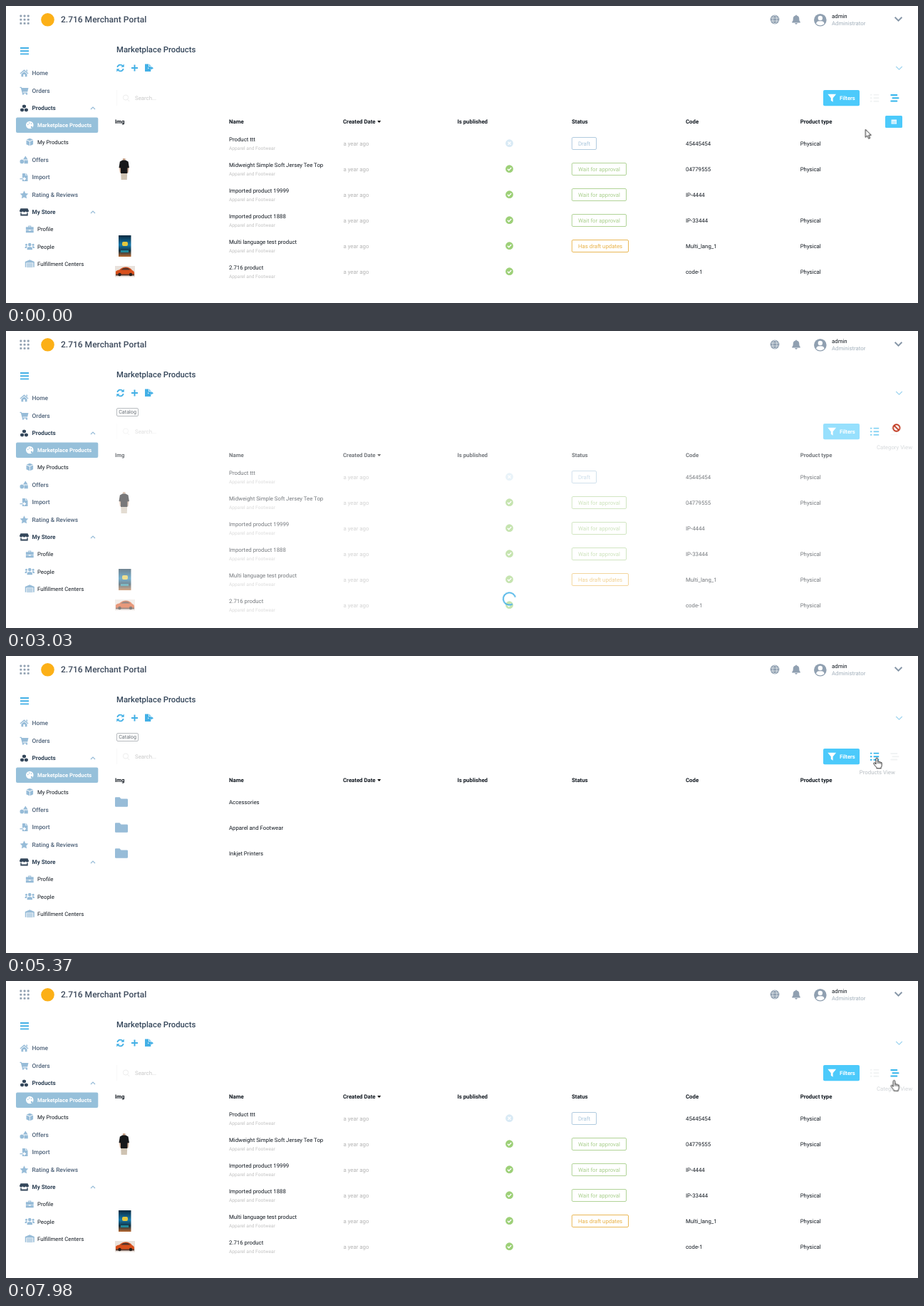
An HTML page that plays this animation: 1280 px wide and 417 px high, repeating every 8 s.

```html
<!DOCTYPE html>
<html lang="en">
<head>
<meta charset="utf-8">
<title>Vendor portal</title>
<style>
html, body { margin: 0; width: 100%; height: 100%; overflow: hidden; background: #fff; }
svg { display: block; width: 100%; height: 100%; }
text { font: 400 7.8px Roboto, Arial, sans-serif; fill: #111820; text-rendering: geometricPrecision; white-space: pre; }
.title { font-size: 12px; font-weight: 500; fill: #3d4a5c; }
.h1 { font-size: 11.3px; font-weight: 500; fill: #34465a; }
.item { font-size: 8.4px; font-weight: 500; fill: #4d6178; }
.section { font-size: 8.2px; font-weight: 700; fill: #2f4256; }
.on { font-weight: 700; font-size: 7.7px; fill: #fff; }
.head { font-weight: 700; }
.sub { font-size: 6.65px; fill: #c2c2c2; }
.dim { fill: #b4b4b4; }
.hint { fill: #c8c8c8; }
.tag { font-size: 7.2px; fill: #666d74; }
.role { fill: #a3b0bc; }
.tip { fill: #b7bdc2; }
.ico { fill: #97bcd8; }
.dark { fill: #34475b; }
.top { fill: #90a0b1; }
.blue { fill: #43b0e6; }
.line { fill: none; stroke: #97bcd8; stroke-width: 1.2; }

/* one loop is 8 s: 1 % = 80 ms */
.shift, .crumb, .cat, .list, .catMode, .listMode, .cols, .spinner, #cursor > * { animation: 8s step-end infinite; }
.shift { animation-name: shift; }
.crumb, .catMode { animation-name: catMode; }
.listMode { animation-name: listMode; }
.cat { animation-name: catRows; }
.list { animation-name: listRows; }
.cols { animation-name: cols; }
.spinner { animation-name: spinner; }
.turn { animation: turn calc(8s / 11) linear infinite; }
.body { animation: load 8s linear infinite; }
.tipCat { animation: tipCat 8s linear infinite; }
.tipList { animation: tipList 8s linear infinite; }
#cursor { animation: move 8s linear infinite; }
#cursor .arrow { animation-name: arrow; }
#cursor .hand { animation-name: hand; }
#cursor .deny { animation-name: deny; }
#cursor .busy { animation-name: busy; }

@keyframes shift { 0%, 73.875% { transform: none } 36.375% { transform: translateY(12px) } }
@keyframes catMode { 0%, 73.875%, 100% { visibility: hidden } 36.375% { visibility: visible } }
@keyframes listMode { 0%, 73.875%, 100% { visibility: visible } 36.375% { visibility: hidden } }
@keyframes catRows { 0%, 82.125%, 100% { visibility: hidden } 45% { visibility: visible } }
@keyframes listRows { 0%, 82.125%, 100% { visibility: visible } 45% { visibility: hidden } }
@keyframes cols { 0% { visibility: visible } 5.25%, 100% { visibility: hidden } }
@keyframes spinner {
  0%, 45.375%, 82.5%, 100% { visibility: hidden; transform: translate(706.5px, 370px) }
  36.375% { visibility: visible; transform: translate(706.5px, 376px) }
  73.875% { visibility: visible; transform: translate(706.5px, 370px) }
}
@keyframes turn { to { transform: rotate(360deg) } }
@keyframes load {
  0%, 36.375%, 46.125%, 73.875%, 84.75%, 100% { opacity: 1 }
  39.75%, 45%, 77.25%, 82.125% { opacity: .07 }
}
@keyframes tipCat { 0%, 7.5%, 57.5%, 98.25% { opacity: 0 } 10%, 55.5% { opacity: 1 } 100% { opacity: .75 } }
@keyframes tipList { 0%, 58.5%, 73.9%, 100% { opacity: 0 } 61%, 73.875% { opacity: 1 } }
@keyframes move {
  0%, .375% { transform: translate(1206.3px, 173.3px) }
  4.5% { transform: translate(1236px, 149.3px) }
  7.5% { transform: translate(1246.5px, 138.5px) }
  10.125%, 11.9% { transform: translate(1249.3px, 135px) }
  12%, 16.8% { transform: translate(1249.3px, 134px) }
  18.4%, 29.9% { transform: translate(1249.3px, 132.3px) }
  30%, 31.8% { transform: translate(1249.5px, 131.3px) }
  31.9%, 55.5% { transform: translate(1249.7px, 130px) }
  61.875%, 70.8% { transform: translate(1222.3px, 143px) }
  71.6%, 73.8% { transform: translate(1222.3px, 143.6px) }
  73.875%, 96% { transform: translate(1222.3px, 143px) }
  99.75%, 100% { transform: translate(1246.5px, 139.5px) }
}
@keyframes arrow { 0%, 82.5% { visibility: visible } 8.25%, 98.25%, 100% { visibility: hidden } }
@keyframes hand { 0%, 36.375%, 73.875% { visibility: hidden } 8.25%, 58.5%, 98.25%, 100% { visibility: visible } }
@keyframes deny { 0%, 58.5%, 100% { visibility: hidden } 36.375% { visibility: visible } }
@keyframes busy { 0%, 82.5%, 100% { visibility: hidden } 73.875% { visibility: visible } }
</style>
</head>
<body>
<svg viewBox="0 0 1280 417">
  <defs>
    <linearGradient id="poster" x2="0" y2="1">
      <stop offset="0" stop-color="#0a2a40"/><stop offset=".45" stop-color="#1478ab"/>
      <stop offset=".72" stop-color="#123243"/><stop offset="1" stop-color="#b8682f"/>
    </linearGradient>
    <path id="stream" d="M.8.4h8M3 4.700h8M.8 9h8" fill="none" stroke-width="2" stroke-linecap="round"/>
    <path id="bullets" d="M0 0h2.4M0 4.600h2.400M0 9.200h2.400M4.600 0h7.600M4.600 4.600h7.600M4.600 9.200h7.600" fill="none" stroke-width="1.9"/>
  </defs>

  <!-- top bar -->
  <g id="dots" class="top"></g>
  <circle cx="58.5" cy="19.3" r="9.3" fill="#fcb017"/>
  <text class="title" x="77" y="23.3">2.716 Merchant Portal</text>
  <circle class="top" cx="1079" cy="19" r="6.4"/>
  <g fill="none" stroke="#fff" stroke-width=".6">
    <path d="M1073.4 17h11.2M1073.4 21h11.2"/>
    <ellipse cx="1079" cy="19" rx="2.9" ry="6"/>
  </g>
  <path class="top" d="M1109 12.5c.6 0 .9.4.9 1 2.3.5 3.4 2.2 3.4 4.4 0 2.6.6 3.4 1.5 4.4.3.6 0 1.1-.6 1.1h-10.4c-.6 0-.9-.5-.6-1.1.9-1 1.5-1.8 1.5-4.4 0-2.2 1.1-3.9 3.4-4.4 0-.6.3-1 .9-1zM1107.3 24h3.4a1.7 1.7 0 0 1-3.4 0z"/>
  <circle class="top" cx="1142.8" cy="19.7" r="8.8"/>
  <circle cx="1142.8" cy="17" r="3.2" fill="#fff"/>
  <path d="M1137 24.4q1.3-3.2 3.7-3.2h4.2q2.4 0 3.7 3.2a7.2 7.2 0 0 1-11.6 0z" fill="#fff"/>
  <text x="1159" y="16.6">admin</text>
  <text class="role" x="1159" y="27">Administrator</text>
  <path d="M1247.6 15.8l4.9 4.8 4.9-4.8" fill="none" stroke="#8797a8" stroke-width="2"/>

  <!-- side menu -->
  <path d="M20 59h12M20 63.2h12M20 67.4h12" stroke="#43b0e6" stroke-width="1.9"/>
  <rect x="14" y="156.5" width="115.3" height="21.5" rx="2" fill="#96c0da"/>
  <g id="menu"></g>
  <path class="line" d="M119 145l3-3 3 3M119 291l3-3 3 3"/>

  <!-- page head -->
  <text class="h1" x="155" y="65.2">Marketplace Products</text>
  <path d="M156.3 86a4.3 4.3 0 0 1 7.6-1.8M164.7 88a4.3 4.3 0 0 1-7.6 1.8" fill="none" stroke="#43b0e6" stroke-width="1.7"/>
  <path class="blue" d="M165.7 81.5v4.3h-4.3zM155.3 92.5v-4.3h4.3z"/>
  <path d="M176 87h9M180.5 82.5v9" stroke="#43b0e6" stroke-width="2"/>
  <path class="blue" d="M195 81.5h5v3.4h3.2v1.6h-4v1.4h4v4.1h-8.2zM200.8 81.5l2.6 2.7h-2.6zM203.7 84.8l3.3 2.4-3.3 2.4v-1.7h-3.4v-1.4h3.4z"/>
  <path d="M1249.2 85l4.3 4.2 4.3-4.2" fill="none" stroke="#9fd5f0" stroke-width="1.2"/>

  <g class="crumb">
    <rect x="155.5" y="108.5" width="30" height="11" rx="1.5" fill="#fff" stroke="#a6abb0" stroke-width=".8"/>
    <text class="tag" x="158.2" y="116.3">Catalog</text>
  </g>

  <g class="body"><g class="shift">
    <path d="M155.5 118v22" stroke="#f8f8f8"/>
    <circle cx="168" cy="128.5" r="3.6" fill="none" stroke="#ececec"/>
    <path d="M170.6 131.2l2.6 2.8" stroke="#ececec"/>
    <text class="hint" x="181" y="131.8">Search...</text>
    <rect x="1147" y="118" width="51" height="22.3" rx="2" fill="#4ccafb"/>
    <path d="M1153.3 123.7h11.8l-4.5 5.6v5.4l-2.8-2v-3.4z" fill="#fff"/>
    <text class="on" x="1170" y="131.8">Filters</text>
    <g class="listMode">
      <use href="#bullets" x="1213" y="124.6" stroke="#f1f3f4"/>
      <use href="#stream" x="1241.5" y="124.6" stroke="#33b5ec"/>
    </g>
    <g class="catMode">
      <use href="#bullets" x="1213" y="124.6" stroke="#33b5ec"/>
      <use href="#stream" x="1241.5" y="124.6" stroke="#f1f3f4"/>
    </g>
    <g id="heads"></g>
    <path d="M521.2 161h5l-2.5 3z"/>
    <g class="cols">
      <rect x="1234" y="154" width="24" height="17" rx="1.5" fill="#4ccafb"/>
      <path d="M1242.6 159.6h7.4v6h-7.4z" fill="#fff"/>
      <path d="M1242.6 161.8h7.4M1242.6 163.8h7.4M1245.1 161.5v4M1247.6 161.5v4" stroke="#4ccafb" stroke-width=".4"/>
    </g>
    <g id="list" class="list"></g>
    <g id="cat" class="cat"></g>
    <text class="tip tipCat" x="1222" y="154.3">Category View</text>
    <text class="tip tipList" x="1197.8" y="154.3">Products View</text>
  </g></g>

  <g class="spinner">
    <circle class="turn" r="8.6" fill="none" stroke="#43b0e6" stroke-width="1.8" pathLength="360" stroke-dasharray="285 75"/>
  </g>

  <g id="cursor">
    <path class="arrow" d="M0 0v11.2l2.6-2.4 1.9 4.2 1.9-.9-1.9-4h3.6z" fill="#fff" stroke="#111" stroke-width=".9"/>
    <g class="hand">
      <path d="M-1.3 9V1.4a1.3 1.3 0 0 1 2.6 0v4a1.2 1.2 0 0 1 2.1.5 1.2 1.2 0 0 1 2 .6 1.1 1.1 0 0 1 1.5 1v3.1q0 1.4-1 2.6v1.6H-.3v-1.2q-2-2-4-5-.6-1.3.4-1.8 1.2-.4 2.6 2.2z" fill="#fff" stroke="#111" stroke-width=".9"/>
      <path d="M1.3 5.5v2.7M3.4 6v2.3M5.4 6.6v1.9" stroke="#111" stroke-width=".7"/>
    </g>
    <g class="deny" fill="none" stroke="#c0361c" stroke-width="1.9">
      <circle cx="0" cy="6" r="4.7"/>
      <path d="M-3.3 2.7l6.6 6.6"/>
    </g>
    <g class="busy"><g transform="translate(6.5 10)">
      <circle r="5" fill="none" stroke="#2ba6f2" stroke-width="3"/>
      <circle class="turn" r="5" fill="none" stroke="#5cc9fb" stroke-width="3" pathLength="360" stroke-dasharray="120 240"/>
    </g></g>
  </g>
</svg>

<script>
const put = (id, html) => document.getElementById(id).innerHTML = html;
const text = (x, y, s, cls = '') => `<text x="${x}" y="${y}" class="${cls}">${s}</text>`;
const path = (d, cls = 'ico') => `<path d="${d}" class="${cls}"/>`;

let dots = '';
for (let i = 0; i < 9; i++) {
  dots += `<rect x="${19.4 + i % 3 * 5.2}" y="${12.5 + Math.floor(i / 3) * 5.2}" width="2.9" height="2.9" rx=".9"/>`;
}
put('dots', dots);

// icons are drawn around their centre
const box = (x, y) => `M${x} ${y}l2.5 1.2v2.7l-2.5 1.2-2.5-1.2v-2.7z`;
const icon = {
  home: path('M-6 .3L0-5l6 5.3-.8.9L0-3l-5.2 4.2zM-4 1.3L0-2l4 3.3V5H1.2V1.8h-2.4V5H-4zM3-4.8h1.5v3L3-3z'),
  cart: path('M-6-5h2.2l.5 1.3H6L4.7 1.6h-6.6l.3 1.2h6v1.2h-7L-4.7-3.8H-6z') +
    '<g class="ico"><circle cx="-1.5" cy="4.6" r="1.2"/><circle cx="3.5" cy="4.6" r="1.2"/></g>',
  boxes: path(box(0, -5) + box(-2.9, 0) + box(2.9, 0), 'dark'),
  palette: '<circle r="5.3" fill="#fff"/><g fill="#96c0da"><circle cx="-2.5" cy="-.5" r=".8"/><circle cx="-.5" cy="-2.8" r=".8"/>' +
    '<circle cx="2.3" cy="-1.8" r=".8"/><circle cx="2.6" cy="3" r="1.2"/></g>',
  cube: path('M0-5.3l4.6 1.9L0-1.5l-4.6-1.9zM-4.8-2.5l4.4 1.8v5.9l-4.4-2zM4.8-2.5L.4-.7v5.9l4.4-2z'),
  shapes: path('M1.8-5.5l3.3 5h-6.6zM0 .6h5.3v4.7H0zM-3.2-.4a2.8 2.8 0 1 1 0 5.6 2.8 2.8 0 0 1 0-5.6z'),
  file: path('M-2.5-5.5h4.3v3.2H5v7.8h-7.5V3.2h2V5L3 2.2-.5-.5v1.7h-2zM2.6-5.5L5-3H2.6zM-6 1.5h4v1.3h-4z'),
  star: path('M0-5.8l1.8 3.7 4 .6-2.9 2.8.7 4L0 3.4l-3.600 1.900.7-4-2.900-2.800 4-.6z'),
  store: path('M-5-5.3H5L6.5-2q0 2-1.9 2T2.2-1.3Q1.5 0 0 0t-2.2-1.3Q-2.8 0-4.6 0t-1.9-2zM-5.2.9h1.5v2h7.4v-2h1.5V5H-5.2z', 'dark'),
  brief: path('M-2-3.3V-5h4v1.7h3.4V.4h-10.8v-3.7h2.4zM-1-4v.7h2V-4zM-5.4 1.1h3.9v1h3v-1h3.9v3.6H-5.4z'),
  people: '<g class="ico"><circle cy="-2.5" r="2.3"/><circle cx="-4.8" cy="-2.4" r="1.5"/><circle cx="4.8" cy="-2.4" r="1.5"/></g>' +
    path('M-3.7 4.7V3Q-3.5.6-1.2.6h2.4Q3.5.6 3.7 3v1.7zM-6.8 2.5Q-6.8-.3-4.8-.3q1 0 1.6.6-1.2.8-1.4 2.2zM6.8 2.5Q6.8-.3 4.8-.3q-1 0-1.6.6 1.2.8 1.4 2.2z'),
  depot: path('M0-5.3L6.5-2.5v7.7H5V-1H-5v6.2h-1.5v-7.7zM-4.2-.2h8.4v1.3h-8.4zM-4.2 1.9h8.4v1.3h-8.4zM-4.2 4h8.4v1.2h-8.4z')
};
const menu = [
  ['Home', 94.2, 'home', 'item'], ['Orders', 118.8, 'cart', 'item'],
  ['Products', 143.4, 'boxes', 'section'], ['Marketplace Products', 167, 'palette', 'on'],
  ['My Products', 191, 'cube', ''], ['Offers', 216, 'shapes', 'item'],
  ['Import', 240.4, 'file', 'item'], ['Rating &amp; Reviews', 265, 'star', 'item'],
  ['My Store', 289.5, 'store', 'section'], ['Profile', 313.5, 'brief', ''],
  ['People', 337.6, 'people', ''], ['Fulfillment Centers', 361.6, 'depot', '']
];
put('menu', menu.map(([label, y, key, cls]) => {
  const main = cls === 'item' || cls === 'section';
  return `<g transform="translate(${main ? 25.5 : 33.3} ${y})">${icon[key]}</g>` +
    text(main ? 36.5 : 44, y + 2.9, label, cls);
}).join(''));

const cols = [153, 313, 473, 633.5, 794, 954, 1114.7];
put('heads', ['Img', 'Name', 'Created Date', 'Is published', 'Status', 'Code', 'Product type']
  .map((s, i) => text(cols[i], 165, s, 'head')).join(''));

const badges = {
  Draft: ['#a9c6dc', 35], 'Wait for approval': ['#a9cf8c', 77], 'Has draft updates': ['#e8b044', 80]
};
const badge = (label, y) => {
  const [color, w] = badges[label];
  return `<rect x="794.3" y="${y - 8.5}" width="${w - .8}" height="17" rx="1.5" fill="none" stroke="${color}" stroke-width=".9"/>` +
    `<text x="803" y="${y + 2.8}" style="fill:${color}">${label}</text>`;
};
const mark = (yes, y) => `<g transform="translate(706.5 ${y})"><circle r="5.4" fill="${yes ? '#9dd078' : '#d9eaf5'}"/>` +
  `<path d="${yes ? 'M-2.6.1l1.9 1.9 3.4-3.6' : 'M-2-2l4 4M2-2l-4 4'}" fill="none" stroke="#fff" stroke-width="1.4"/></g>`;

const tee = '<g transform="translate(165.7 229) scale(.9 1)"><rect x="-2" y="-15" width="4" height="5" fill="#c9a48c"/>' +
  '<path d="M-7.500-3h3v8h-2zM4.500-3h3l-1 8h-2z" fill="#c9a48c"/><path d="M-5 5H5l-.5 10h-9z" fill="#cfc3b2"/>' +
  '<path d="M-2.5-12.500h5l4 2 1.500 8.500-2.800.5V6H-5.200v-7.500L-8-2l1.500-8.500z" fill="#17181a"/></g>';
const poster = '<rect x="158" y="322" width="17.5" height="30" fill="url(#poster)"/>' +
  '<rect x="163" y="331" width="8" height="6" rx="2" fill="#e2c73e"/><rect x="161" y="343" width="11" height="3" fill="#22889a"/>';
const car = '<rect x="153" y="365" width="28" height="15.5" fill="#e9e2dc"/>' +
  '<path d="M154 373q1-2 5-2.5 4-4 9-4 6 0 9 4.5 3 1 3 4v2h-26z" fill="#d8501c"/>' +
  '<path d="M161 370.5q3-3 7-3 4 0 6.5 3z" fill="#54352c"/><path d="M154 376.5h26v2h-26z" fill="#5b3a30"/>' +
  '<circle cx="159.5" cy="377" r="2.2" fill="#26211f"/><circle cx="175" cy="377" r="2.2" fill="#26211f"/>';

const wait = 'Wait for approval', type = 'Physical';
const rows = [
  ['Product ttt', 'Draft', '45445454', type],
  ['Midweight Simple Soft Jersey Tee Top', wait, '04779555', type],
  ['Imported product 19999', wait, 'IP-4444', ''],
  ['Imported product 1888', wait, 'IP-33444', type],
  ['Multi language test product', 'Has draft updates', 'Multi_lang_1', type],
  ['2.716 product', '', 'code-1', type]
];
const rowY = i => 193 + i * 36;
put('list', tee + poster + car + rows.map(([name, status, code, kind], i) => {
  const y = rowY(i);
  return text(313, y - 2.8, name) + text(313, y + 9, 'Apparel and Footwear', 'sub') +
    text(473.5, y + 2.8, 'a year ago', 'dim') + mark(i > 0, y - .3) +
    (status && badge(status, y)) + text(954, y + 2.8, code) + text(1114.7, y + 2.8, kind);
}).join(''));

put('cat', ['Accessories', 'Apparel and Footwear', 'Inkjet Printers'].map((s, i) => {
  const y = rowY(i);
  return path(`M154 ${y - 6.8}h5.5l2 2.2h8.2q1.3 0 1.3 1.3v8.7q0 1.4-1.3 1.4h-15.4q-1.3 0-1.3-1.4v-10.8q0-1.4 1-1.4z`) +
    text(313, y + 2.8, s);
}).join(''));
</script>
</body>
</html>
```
